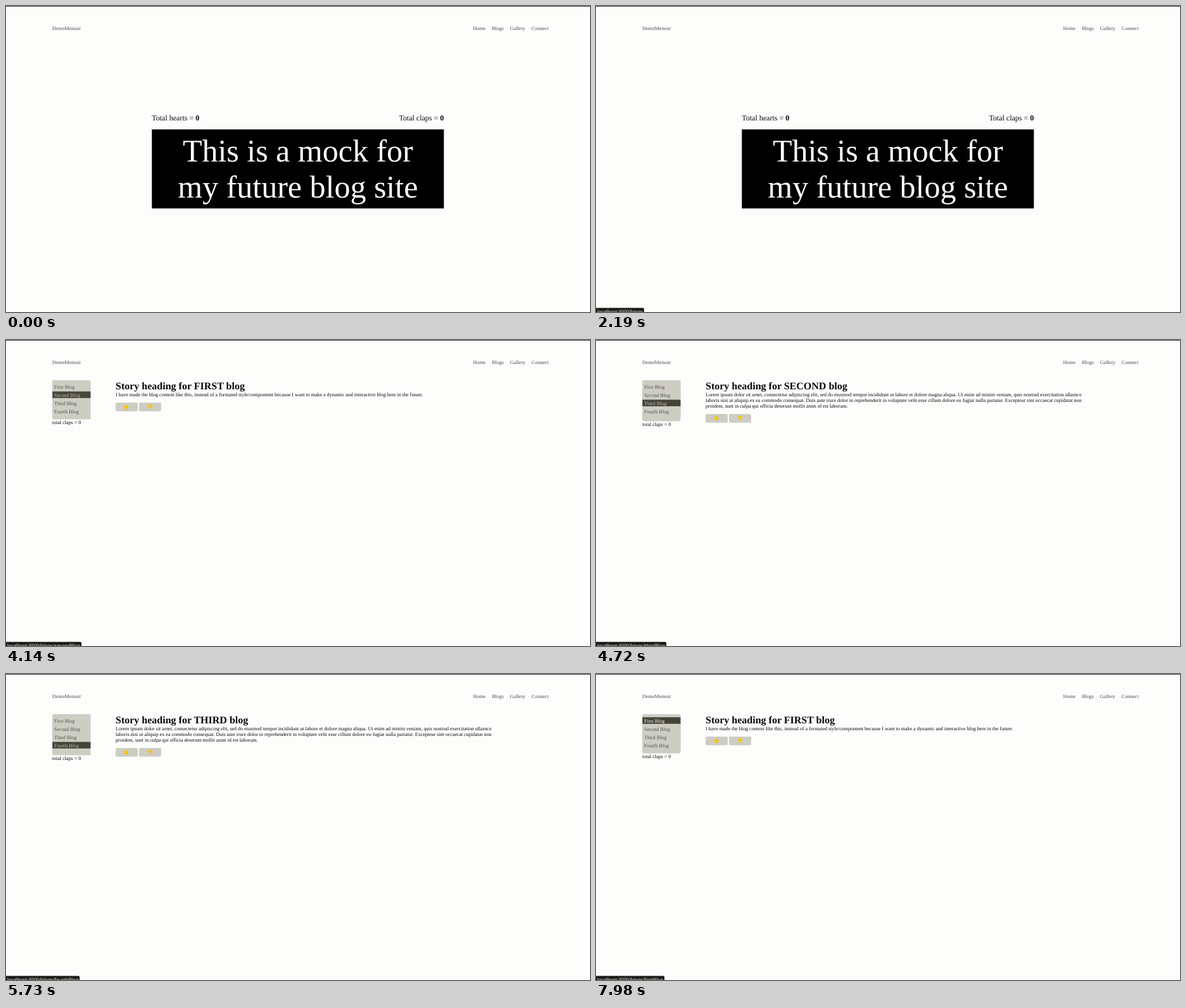
An HTML page that plays this animation: 922 by 484 pixels, repeating every 8 s.

```html
<!DOCTYPE html>
<html lang="en">
<head>
<meta charset="utf-8">
<title>Mock blog</title>
<style>
  html, body { margin: 0; width: 100%; height: 100%; overflow: hidden; background: #fdfdfb; }
  svg { display: block; width: 922px; height: 484px; }
  text { font: 8px "Liberation Serif", "Times New Roman", serif; fill: #080808; text-rendering: geometricPrecision; }
  .nav { fill: #48484a; }
  .end { text-anchor: end; }
  .count { font-size: 12px; }
  .bold { font-weight: bold; }
  .title { font-size: 50px; fill: #fdfdfb; text-anchor: middle; }
  .head { font-size: 16px; font-weight: bold; }
  .panel { fill: #cdcdc4; }
  .emoji { fill: #f8c40c; stroke: #f8c40c; stroke-linecap: round; }
  #status text { font: 7.4px "Noto Sans", "Open Sans", sans-serif; fill: #ececea; }
</style>
</head>
<body>
<svg viewBox="0 0 922 484">
  <rect width="922" height="484" fill="#fdfdfb"/>
  <rect width="922" height="1" fill="#3c3c34"/>
  <text class="nav" x="73" y="37.5">DemoMemoir</text>
  <text class="nav end" x="856.5" y="37.5">Home<tspan dx="10">Blogs</tspan><tspan dx="10">Gallery</tspan><tspan dx="10">Connect</tspan></text>

  <g id="home">
    <text class="count" x="230.3" y="181">Total hearts = <tspan class="bold">0</tspan></text>
    <text class="count end" x="691.3" y="181">Total claps = <tspan class="bold">0</tspan></text>
    <rect x="230.3" y="195.2" width="461" height="125"/>
    <text class="title" x="460.8" y="245.8">This is a mock for</text>
    <text class="title" x="460.8" y="303.3">my future blog site</text>
  </g>

  <g id="blog">
    <rect id="panel" class="panel" x="73" y="63.5" width="60.5" rx="2.5"/>
    <g id="links"></g>
    <text id="claps" x="73">total claps = 0</text>
    <text id="head" class="head" x="173" y="78"></text>
    <g id="body"></g>
    <g id="buttons">
      <rect class="panel" x="173" y="99" width="35" height="13.7" rx="2.5"/>
      <rect class="panel" x="210" y="99" width="35" height="13.7" rx="2.5"/>
      <g id="hand" class="emoji" transform="translate(190.5 106.5)">
        <circle r="2.6"/>
      </g>
      <g class="emoji" transform="translate(228 105.8)">
        <rect x="-2.8" y="-3" width="5.6" height="3" rx="1"/>
        <path d="M0 0V3" stroke-width="1.8"/>
      </g>
    </g>
  </g>

  <g id="status">
    <rect x="-3" y="477.6" height="10" rx="2" fill="#1a1a16"/>
    <text x="2" y="485.7"></text>
  </g>
</svg>
<script>
const LOOP = 8000, OPEN = 2850, FADE = 250, ROW = 13;
const $ = id => document.getElementById(id);
const svgNode = (tag, attrs, parent) => {
  const el = document.createElementNS("http://www.w3.org/2000/svg", tag);
  for (const key in attrs) el.setAttribute(key, attrs[key]);
  return parent.appendChild(el);
};

const intro = ["I have made the blog content like this, instead of a formated style/compontent because I want to make a dynamic and interactive blog here in the future."];
const lorem = [
  "Lorem ipsum dolor sit amet, consectetur adipiscing elit, sed do eiusmod tempor incididunt ut labore et dolore magna aliqua. Ut enim ad minim veniam, quis nostrud exercitation ullamco",
  "laboris nisi ut aliquip ex ea commodo consequat. Duis aute irure dolor in reprehenderit in voluptate velit esse cillum dolore eu fugiat nulla pariatur. Excepteur sint occaecat cupidatat non",
  "proident, sunt in culpa qui officia deserunt mollit anim id est laborum."
];

// The pointer's stops in the side menu
const visits = [
  { name: "Second", enter: 3910, click: 4200, leave: 4400 },
  { name: "Third", enter: 4430, click: 4900, leave: 5280 },
  { name: "Fourth", enter: 5300, click: 5870, leave: 6600 },
  { name: "Second", enter: 6690, click: Infinity, leave: 6820 },
  { name: "First", enter: 6830, click: 7120, leave: Infinity }
];

function ramp(t, from, length = FADE) {
  const k = Math.min(1, Math.max(0, (t - from) / length));
  return k * k * (3 - 2 * k);
}
const mix = (a, b, k) => `rgb(${a.map((v, i) => Math.round(v + (b[i] - v) * k))})`;
const last = (key, t) => visits.filter(v => t >= v[key]).pop();

const rows = ["First", "Second", "Third", "Fourth"].map((name, i) => {
  const bar = svgNode("rect", { x: 73.3, y: 68.4 + ROW * i, width: 60.2, height: 10.4 }, $("links"));
  const label = svgNode("text", { x: 76, y: 76.5 + ROW * i }, $("links"));
  label.textContent = name + " Blog";
  return { bar, label, stops: visits.filter(v => v.name === name) };
});
const lines = lorem.map((_, i) => svgNode("text", { x: 173, y: 89 + 9 * i }, $("body")));
for (let i = 0; i < 5; i++) {
  svgNode("path", { d: "M0 0V-3.4", "stroke-width": 1.3, transform: `rotate(${i * 32 - 80})` }, $("hand"));
}
const [bubble, url] = $("status").children;

function showPage(name) {
  const first = name === "First";
  $("head").textContent = `Story heading for ${name.toUpperCase()} blog`;
  lines.forEach((line, i) => line.textContent = (first ? intro : lorem)[i] || "");
  $("panel").setAttribute("height", first ? 62 : 65);
  $("claps").setAttribute("y", first ? 132.5 : 135.5);
  $("buttons").setAttribute("transform", `translate(0 ${first ? 0 : 18})`);
}

function showStatus(t) {
  const stop = last("enter", t);
  const link = "localhost:3000/blogs" + (stop ? `/${stop.name.toLowerCase()}Blog` : "");
  if (url.textContent !== link) {
    url.textContent = link;
    bubble.setAttribute("width", url.getComputedTextLength() + 7);
  }
  const alpha = stop ? ramp(t, stop === visits[0] ? stop.enter : 0, 120)
                     : ramp(t, 1860, 120) - ramp(t, OPEN, 190);
  $("status").setAttribute("opacity", alpha);
}

function draw(t) {
  $("home").style.display = t < OPEN ? "" : "none";
  $("blog").style.display = t < OPEN ? "none" : "";
  showPage(last("click", t)?.name || "First");
  for (const { bar, label, stops } of rows) {
    let hover = 0, ink = 0;
    for (const { enter, click, leave } of stops) {
      const stay = 1 - ramp(t, leave);
      hover += ramp(t, enter) * stay;
      ink += (.6 * ramp(t, enter) + .4 * ramp(t, click)) * stay;
    }
    bar.setAttribute("fill", mix([205, 205, 196], [68, 68, 56], hover));
    label.style.fill = mix([84, 84, 80], [253, 253, 251], ink);
  }
  showStatus(t);
}

const start = performance.now();
function tick() {
  draw((performance.now() - start) % LOOP);
  requestAnimationFrame(tick);
}
tick();
</script>
</body>
</html>
```
